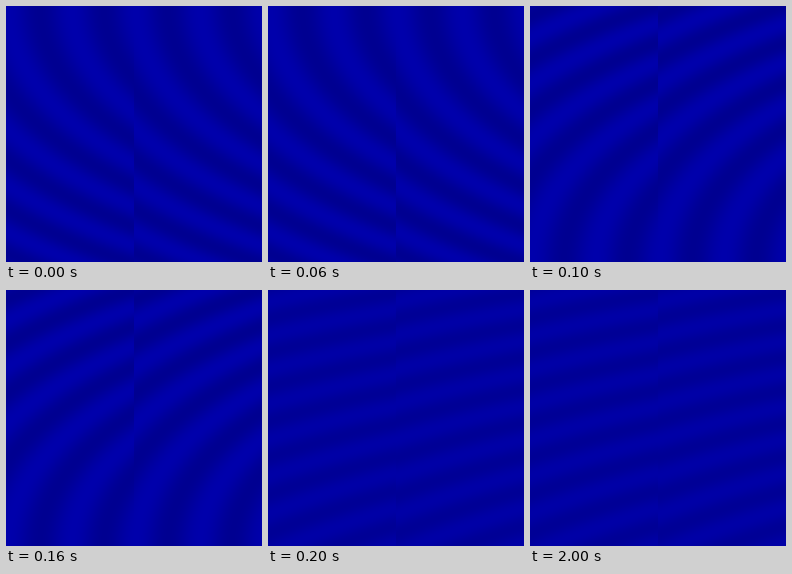
An HTML page with a canvas that plays this animation: 256 px wide and 256 px high, repeating every 3.2 s.

```html
<!DOCTYPE html>
<html lang="en">
<head>
<meta charset="utf-8">
<title>Blue ripples</title>
<style>
html, body { margin: 0; width: 100%; height: 100%; overflow: hidden; background: #00009e; }
canvas { display: block; width: 100vw; height: 100vh; }
</style>
</head>
<body>
<canvas id="stage" width="256" height="256"></canvas>
<script>
const SIZE = 256, TILE = 128, LOOP = 3200;
const CENTRE_X = 510, SQUASH = 0.47, WAVE = 30;
const ctx = document.getElementById('stage').getContext('2d');

// Each pose: start time, height of the ripple centre,
// radius of one dark ring, and strength of the shading.
const poses = [
  { at: 0, cy: 0, dark: 284, amp: 13 },
  { at: 100, cy: 256, dark: 284, amp: 13 },
  { at: 200, cy: 512, dark: 450, amp: 8 }
];

function paint({ cy, dark, amp }) {
  const image = ctx.createImageData(SIZE, SIZE);
  for (let y = 0; y < SIZE; y++) {
    for (let x = 0; x < SIZE; x++) {
      const r = Math.hypot((x % TILE - CENTRE_X) * SQUASH, y - cy);
      const i = (y * SIZE + x) * 4;
      image.data[i + 2] = 158 - amp * Math.cos((r - dark) / WAVE * 2 * Math.PI);
      image.data[i + 3] = 255;
    }
  }
  return image;
}

const images = poses.map(paint);
const start = performance.now();
let shown = -1;

function draw(now) {
  const t = Math.max(0, now - start) % LOOP;
  const index = poses.filter(p => p.at <= t).length - 1;
  if (index !== shown) {
    ctx.putImageData(images[index], 0, 0);
    shown = index;
  }
  requestAnimationFrame(draw);
}
draw(start);
</script>
</body>
</html>
```
